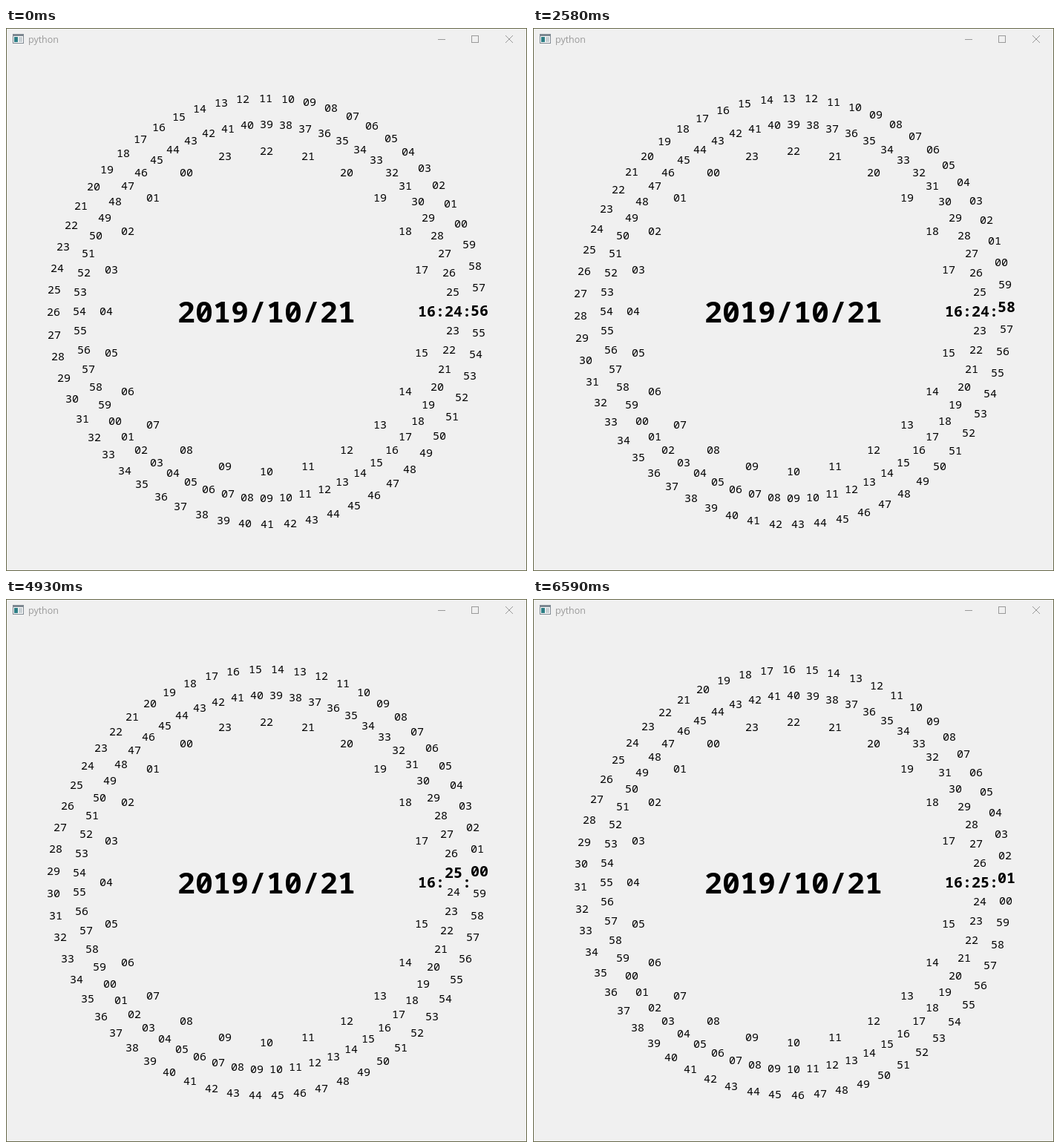
Recreate the animation shown at these times as an HTML page with a canvas. Size 702 px wide and 732 px high, loop 6690 ms.

```html
<!DOCTYPE html>
<html lang="en">
<head>
<meta charset="utf-8">
<title>python</title>
<style>
  html, body { margin: 0; width: 100%; height: 100%; overflow: hidden; background: #f0f0f0; }
  canvas { display: block; }
</style>
</head>
<body>
<canvas id="stage" width="702" height="732"></canvas>
<script>
const ctx = document.getElementById('stage').getContext('2d');
const LOOP = 6690, CX = 351, CY = 382;
const MONO = '"Noto Sans Mono", "DejaVu Sans Mono", monospace';

// Playback time in ms against clock seconds since 16:24:56
const CLOCK = [[0, 0.975], [1100, 1.801], [2580, 2.89], [3940, 3.866],
               [4930, 4.707], [5980, 5.342], [6590, 5.904]];
// Intervals in which the picture stands still
const HOLDS = [[0, 20], [2700, 2800], [3460, 3560], [4930, 5030], [6590, LOOP]];

function clockAt(t) {
  const hold = HOLDS.find(([a, b]) => t >= a && t < b);
  if (hold) t = hold[0];
  let i = 1;
  while (i < CLOCK.length - 1 && t > CLOCK[i][0]) i++;
  const [t0, c0] = CLOCK[i - 1], [t1, c1] = CLOCK[i];
  return c0 + (c1 - c0) * (t - t0) / (t1 - t0);
}

const pad = n => String(n).padStart(2, '0');

function label(text, x, y, size, bold) {
  ctx.font = `${bold ? 'bold ' : ''}${size}px ${MONO}`;
  ctx.fillText(text, Math.round(x), Math.round(y) + Math.round(size * 0.357 - 0.35));
}

// Current value sits at the right; later values follow counterclockwise
function ring(count, radius, current, shift) {
  for (let i = 0; i < count; i++) {
    const a = ((i - current) * 360 / count + shift) * Math.PI / 180;
    const now = i === current;
    label(pad(i), CX + radius * Math.cos(a), CY - radius * Math.sin(a), now ? 20 : 15, now);
  }
}

function lines(color, ...paths) {
  ctx.strokeStyle = color;
  ctx.lineWidth = 1;
  ctx.beginPath();
  for (const [x0, y0, x1, y1] of paths) {
    ctx.moveTo(x0, y0);
    ctx.lineTo(x1, y1);
  }
  ctx.stroke();
}

function box(color, x, y, w, h) {
  ctx.fillStyle = color;
  ctx.fillRect(x, y, w, h);
}

function drawWindow() {
  box('#f0f0f0', 0, 0, 702, 732);
  ctx.strokeStyle = '#68694a';
  ctx.lineWidth = 1;
  ctx.strokeRect(0.5, 0.5, 701, 731);

  box('#7d8790', 9, 8, 15, 13);
  box('#ffffff', 10, 11, 13, 9);
  box('#2f7f86', 11, 12, 5, 7);
  box('#c9d0d4', 17, 12, 5, 7);

  ctx.fillStyle = '#999999';
  ctx.textAlign = 'left';
  ctx.font = '12.5px "Open Sans", "Noto Sans", sans-serif';
  ctx.fillText('python', 30, 20);

  lines('#999999', [582, 15.5, 592, 15.5], [673, 10, 683, 20], [683, 10, 673, 20]);
  ctx.strokeRect(627.5, 10.5, 9, 9);
}

function draw(t) {
  const clock = clockAt(t);
  const elapsed = Math.floor(clock);
  const second = (56 + elapsed) % 60;
  const minute = elapsed < 4 ? 24 : 25;
  const left = 6 * (1 - (clock - elapsed) ** 2);

  drawWindow();
  ctx.fillStyle = '#000000';
  ctx.textAlign = 'center';
  label('2019/10/21', CX, 383, 40, true);
  ring(24, 216, 16, 0);
  ring(60, 252, minute, second === 0 ? left : 0);
  ring(60, 287.5, second, left);
  label(':', 585, CY, 20, true);
  label(':', 621, CY, 20, true);
}

const start = performance.now();
function tick() {
  draw((performance.now() - start) % LOOP);
  requestAnimationFrame(tick);
}
tick();
</script>
</body>
</html>
```
